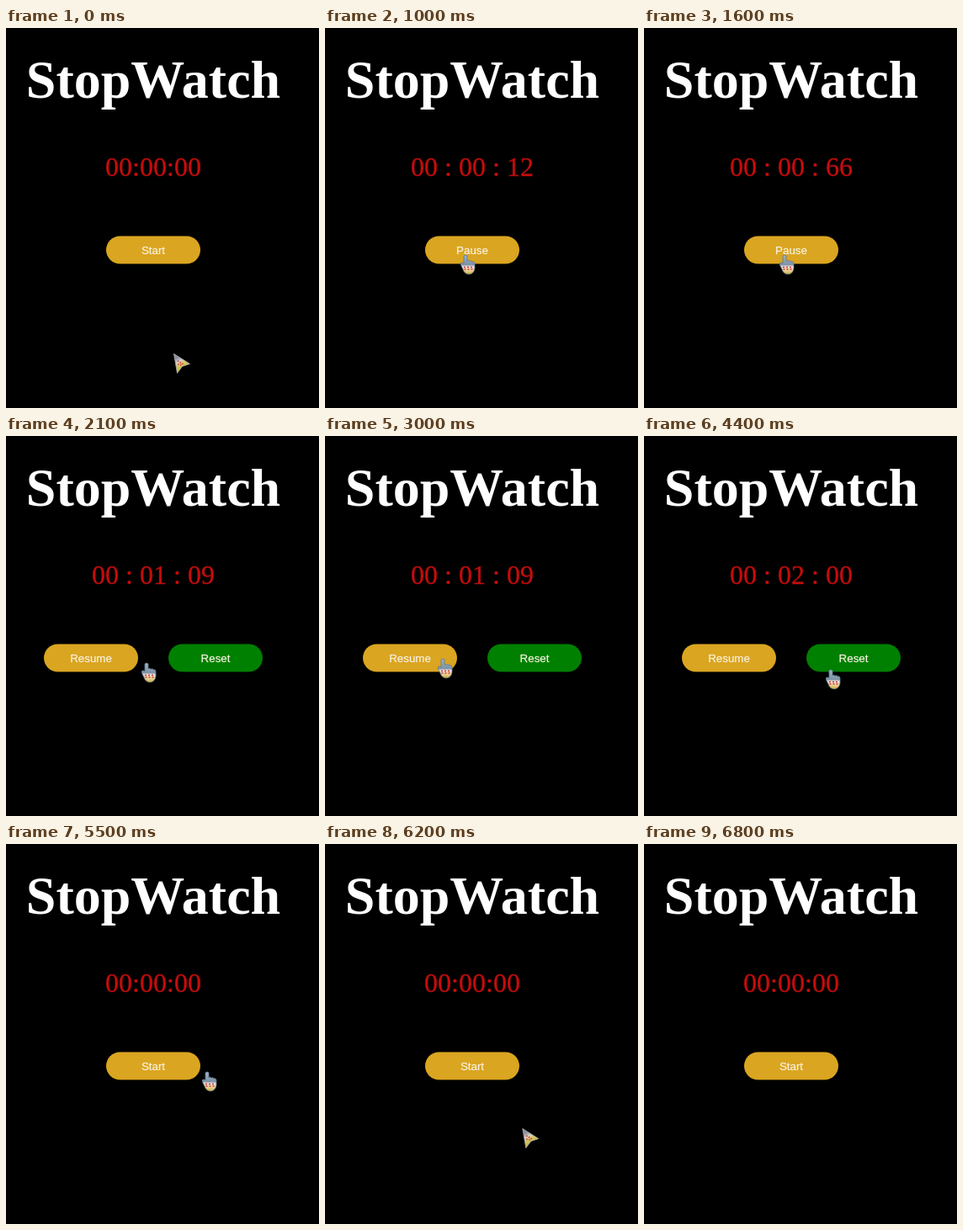
These frames come from a looping animation (372 px wide and 452 px high, 7400 ms). An HTML page:

```html
<!DOCTYPE html>
<html lang="en">
<head>
<meta charset="utf-8">
<title>StopWatch</title>
<style>
  html, body { margin: 0; width: 100%; height: 100%; overflow: hidden; background: #000; }
  svg { display: block; }
  text { text-anchor: middle; }
  .title { font: bold 64px "Liberation Serif", serif; fill: #fff; }
  .clock { font: 32px "Liberation Serif", serif; fill: #c80c0c; stroke: #b4101080; stroke-width: .8px; }
  .button text { font: 13.333px "Liberation Sans", sans-serif; fill: #f8f3e2; stroke: #f8f3e280; stroke-width: .4px; }
</style>
</head>
<body>
<svg width="372" height="452" viewBox="0 0 372 452">
  <defs>
    <linearGradient id="arrowFill" x1="0" y1="0" x2=".45" y2="1">
      <stop offset=".25" stop-color="#8990a2"/>
      <stop offset=".45" stop-color="#d8cfc4"/>
      <stop offset=".62" stop-color="#d9c468"/>
      <stop offset="1" stop-color="#b9b32a"/>
    </linearGradient>
    <linearGradient id="handFill" x1="0" y1="0" x2="0" y2="1">
      <stop offset=".1" stop-color="#93b0c4"/>
      <stop offset=".5" stop-color="#7f93a8"/>
      <stop offset=".6" stop-color="#e8dfe0"/>
      <stop offset=".78" stop-color="#ecd4a0"/>
      <stop offset="1" stop-color="#ccae34"/>
    </linearGradient>
  </defs>
  <rect width="372" height="452"/>
  <text class="title" x="175" y="83">StopWatch</text>
  <text class="clock" id="clock" x="175" y="176"></text>
  <g class="button" id="main">
    <rect x="-56" y="247.5" width="112" height="33" rx="16.5" fill="#daa520"/>
    <text id="label" y="269"></text>
  </g>
  <g class="button" id="reset" transform="translate(249)">
    <rect x="-56" y="247.5" width="112" height="33" rx="16.5" fill="#008000"/>
    <text y="269">Reset</text>
  </g>
  <g id="cursor">
    <g id="arrow">
      <path d="M.5 .5 19.5 12.5 10.5 15.5 4.5 23.5Z" fill="url(#arrowFill)" stroke="#a9b0b4" stroke-width=".8"/>
      <path d="M5 9 12 13M5 13 10 14" stroke="#d23a32" stroke-width="1.6" stroke-dasharray="1.5"/>
    </g>
    <g id="hand">
      <path d="M-2 1Q0-1 2 1V7Q4 5.500 5 7.500Q7 6 8 8Q10.500 7 11 10V16Q10 22.500 4 23Q-1.500 22.500-3 17L-5.500 12V9.500Q-3.500 8.500-2 10Z" fill="url(#handFill)" stroke="#66788c" stroke-width=".8"/>
      <path d="M-2 14.500H10M-1.500 17H9" stroke="#d0352f" stroke-width="1.7" stroke-dasharray="2"/>
    </g>
  </g>
</svg>
<script>
const LOOP = 7400, STEP = 100, RATE = 0.09;
const START = 860, PAUSE = 2100, RESUME = 3190, PAUSE_AGAIN = 4200, RESET = 5500;

// Pointer path: time, x, y
const path = [
  [0, 199, 387], [700, 167, 270], [2400, 167, 270], [3000, 140, 265],
  [4200, 140, 265], [4400, 222, 278], [4800, 239, 271], [5500, 239, 271],
  [5700, 241, 274], [5800, 241, 274], [6800, 222, 456], [LOOP, 222, 456]
];
const handTimes = [[600, 2400], [2700, 4200], [4400, 5500]];

const el = id => document.getElementById(id);
const show = (id, visible) => el(id).style.display = visible ? "" : "none";
const pad = n => String(n).padStart(2, "0");
const between = (t, from, to) => t >= from && t < to;

function pointerAt(t) {
  const i = path.findIndex(([time]) => time > t);
  const [t0, x0, y0] = path[i - 1], [t1, x1, y1] = path[i];
  const p = (t - t0) / (t1 - t0), e = p * p * (3 - 2 * p);
  return [x0 + (x1 - x0) * e, y0 + (y1 - y0) * e];
}

function countAt(t) {
  if (t < PAUSE) return Math.floor((t - START) * RATE);
  if (t < RESUME) return 109;
  return Math.min(200, 109 + Math.round((t - RESUME) * RATE));
}

function render(t) {
  const active = between(t, START, RESET);
  const paused = between(t, PAUSE, RESUME) || between(t, PAUSE_AGAIN, RESET);
  const count = active ? countAt(t) : 0;
  el("clock").textContent = ["00", pad(Math.floor(count / 100)), pad(count % 100)]
    .join(active ? " : " : ":");
  el("label").textContent = paused ? "Resume" : active ? "Pause" : "Start";
  el("main").setAttribute("transform", `translate(${paused ? 101 : 175})`);
  show("reset", paused);

  const hand = handTimes.some(([from, to]) => t >= from && t <= to);
  show("hand", hand);
  show("arrow", !hand);
  el("cursor").setAttribute("transform", `translate(${pointerAt(t)})`);
}

function frame() {
  const t = performance.now() % LOOP;
  render(Math.floor(t / STEP) * STEP);
  requestAnimationFrame(frame);
}
frame();
</script>
</body>
</html>
```
